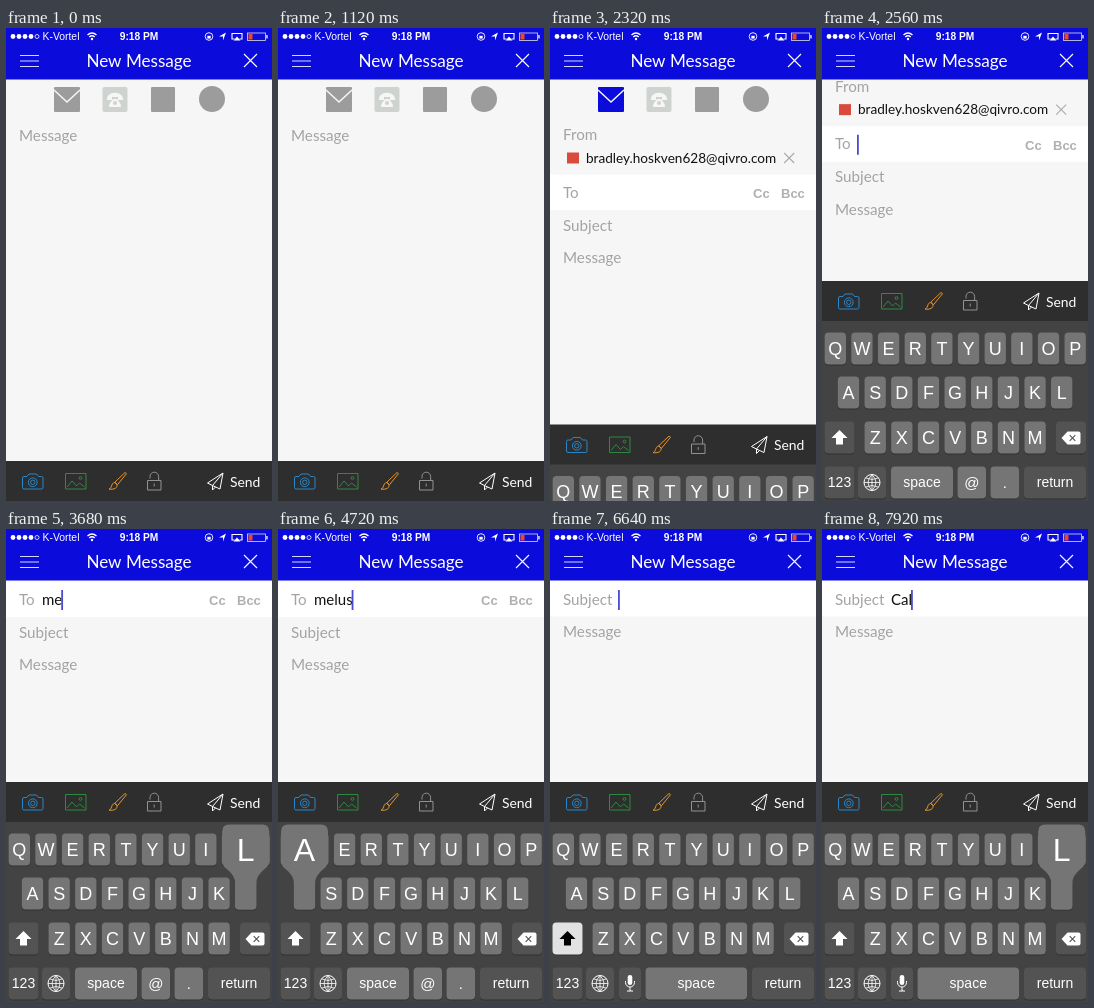
Animation of 266x473 px, one loop 8 s. Source, as an HTML page with a canvas:

```html
<!DOCTYPE html>
<html lang="en">
<head>
<meta charset="utf-8">
<title>New Message</title>
<style>
  html, body { margin: 0; width: 100%; height: 100%; overflow: hidden; background: #f6f6f6; }
  canvas { display: block; width: 266px; height: 473px; }
</style>
</head>
<body>
<canvas id="stage"></canvas>
<script>
const W = 266, H = 473, LOOP = 8000;
const BLUE = '#0b0bdc', GREY = '#9c9c9c', LABEL = '#a3a3a3', PAPER = '#f6f6f6';
const RED_SQUARE = '#d9493c', PURPLE_SQUARE = '#46389c';
const ARIAL = { font: '"Liberation Sans", sans-serif' };
const SENDER = 'bradley.hoskven628@qivro.com';
const SENDER_ALT = 'bradleyhoskven@tulmo.com';
const RECIPIENT = 'melusar.corbrin307@qivro.com';

const canvas = document.getElementById('stage');
const c = canvas.getContext('2d');
const ratio = window.devicePixelRatio || 1;
canvas.width = W * ratio;
canvas.height = H * ratio;

// Key presses: [time, character]; the character lands on release.
const HOLD = 130;
const TO_KEYS = [[3360, 'm'], [3520, 'e'], [3650, 'l'], [3900, 'u'], [4180, 's'], [4720, 'a']];
const SUBJECT_KEYS = [[7120, 'C'], [7400, 'a'], [7630, 'l'], [7890, 'l']];

const ease = (t, from, to) => {
  const x = Math.min(1, Math.max(0, (t - from) / (to - from)));
  return x * x * (3 - 2 * x);
};
const typed = (keys, t) => keys.filter(k => t >= k[0] + HOLD).map(k => k[1]).join('');

function rect(x, y, w, h, color, radius = 0) {
  c.fillStyle = color;
  c.beginPath();
  c.roundRect(x, y, w, h, radius);
  c.fill();
}
function disc(x, y, r, color) {
  c.fillStyle = color;
  c.beginPath();
  c.arc(x, y, r, 0, 7);
  c.fill();
}
function fill(d, color) {
  c.fillStyle = color;
  c.fill(new Path2D(d));
}
function line(d, color, width = 1) {
  c.strokeStyle = color;
  c.lineWidth = width;
  c.stroke(new Path2D(d));
}
function ring(x, y, r, color, width = 1) {
  c.strokeStyle = color;
  c.lineWidth = width;
  c.beginPath();
  c.arc(x, y, r, 0, 7);
  c.stroke();
}
function text(str, x, y, size, color, { font = 'Lato, sans-serif', weight = 400, align = 'left' } = {}) {
  c.font = `${weight} ${size}px ${font}`;
  c.fillStyle = color;
  c.textAlign = align;
  c.fillText(str, x, y + size * 0.35);
  return c.measureText(str).width;
}
const label = (str, y) => text(str, 13, y, 15.2, LABEL);
const cross = (x, y, r, color) =>
  line(`M${x - r} ${y - r}l${2 * r} ${2 * r}M${x + r} ${y - r}l${-2 * r} ${2 * r}`, color, 1.1);

function clipped(y, h, draw) {
  if (h <= 0) return;
  c.save();
  c.beginPath();
  c.rect(0, y, W, h);
  c.clip();
  draw();
  c.restore();
}

function field(str, x, y, t, focusTime, keys) {
  const width = str ? text(str, x, y, 15, '#111') : 0;
  const last = keys.reduce((a, k) => (t >= k[0] ? k[0] : a), focusTime);
  if ((t - last) % 1000 < 600) rect(x - 1 + width, y - 9.5, 1.8, 20, '#4a4ad0');
}

function chip(address, y) {
  rect(17, y - 5.5, 12, 11, RED_SQUARE);
  const width = text(address, 36, y, 13.6, '#111');
  cross(49 + width, y, 5, '#aaa');
}

function accountRow(address, y, color) {
  rect(0, y, W, 37, '#e6e6e6');
  rect(0, y + 36.5, W, 1, '#cfcfcf');
  rect(18, y + 11, 16, 15, color);
  text(address, 46, y + 19, 13.6, '#111');
}

function drawServices(y, picked) {
  rect(48, y - 12, 26, 25, picked ? BLUE : GREY, 1);
  line(`M48 ${y - 9}L61 ${y + 3}L74 ${y - 9}`, PAPER, 1.5);
  rect(96.5, y - 12, 25, 25, '#cfd3cf', 2);
  fill(`M101 ${y - 1}c2-7 14-7 16 0v2h-5v-3h-6v3h-5z`, PAPER);
  fill(`M103 ${y + 8}c0-4 2-5 4-8h4c2 3 4 4 4 8z`, PAPER);
  disc(109, y + 4, 2, '#cfd3cf');
  rect(145, y - 12, 24, 25, GREY, 1);
  disc(206, y, 13, GREY);
}

function drawForm(t) {
  const listOpen = ease(t, 1510, 1780) * (1 - ease(t, 2080, 2320));
  const form = ease(t, 2080, 2320);
  const chipGap = 33 * ease(t, 5600, 5820);
  const scroll = 94 * ease(t, 2403, 2713) + (33 + chipGap) * ease(t, 5960, 6240);
  const toY = 164.5 - scroll, subjectY = toY + 33 + chipGap;
  const toFocus = t >= 2320 && t < 6080, subjectFocus = t >= 6080;

  rect(0, 0, W, H, PAPER);
  drawServices(71 - scroll, t >= 1520);

  if (form > 0) {
    c.globalAlpha = form;
    label('From', 107 - scroll);
    chip(SENDER, 130 - scroll);
    if (toFocus || chipGap) rect(0, toY - 18, W, 35.5 + chipGap, '#fff');
    if (subjectFocus) rect(0, subjectY - 18, W, 35, '#fff');
    label('To', toY);
    text('Cc', 203, toY + 1, 13, '#b0b0b0', { ...ARIAL, weight: 700 });
    text('Bcc', 231, toY + 1, 13, '#b0b0b0', { ...ARIAL, weight: 700 });
    if (chipGap) clipped(toY + 12, chipGap + 5.5, () => chip(RECIPIENT, toY + 23));
    label('Subject', subjectY);
    c.globalAlpha = 1;
    if (toFocus && t >= 2400) {
      const picked = t >= 5520;
      field(picked ? '' : typed(TO_KEYS, t), 36, toY, t, picked ? 5520 : 2400, picked ? [] : TO_KEYS);
    }
    if (subjectFocus) field(typed(SUBJECT_KEYS, t), 69, subjectY, t, 6400, SUBJECT_KEYS);
  }

  label('Message', 107.5 + (subjectY + 32.5 - 107.5) * form);

  clipped(92, 75 * listOpen, () => {
    const y = 92 - 75 * (1 - listOpen);
    accountRow(SENDER, y, RED_SQUARE);
    accountRow(SENDER_ALT, y + 37.5, PURPLE_SQUARE);
  });

  const hint = ease(t, 4880, 5100) * (1 - ease(t, 5440, 5560));
  clipped(88, 37.5 * hint, () => accountRow(RECIPIENT, 88 - 37.5 * (1 - hint), RED_SQUARE));
}

function drawHeader() {
  rect(0, 0, W, 51.5, BLUE);
  for (let i = 0; i < 4; i++) disc(7 + 6 * i, 8.5, 2.4, '#fff');
  ring(31, 8.5, 2, '#fff', 0.8);
  text('K-Vortel', 36.5, 8.5, 10.4, '#fff', ARIAL);
  line('M81.5 7q4.5-4 9 0M83.3 9q2.7-2.4 5.4 0', '#fff', 1.4);
  disc(86, 11, 1.2, '#fff');
  text('9:18 PM', 133, 8.5, 10.2, '#fff', { ...ARIAL, weight: 700, align: 'center' });
  ring(203, 8.5, 3.8, '#fff', 0.9);
  rect(201.3, 7.8, 3.4, 2.8, '#fff');
  fill('M220 4.5L217 12.5V8.5H213z', '#fff');
  line('M228.5 11h-2.5V5.5h10V11h-2.5', '#fff', 1.1);
  fill('M231 8.5l3.5 4h-7z', '#fff');
  c.strokeStyle = '#ddd';
  c.lineWidth = 0.8;
  c.strokeRect(241.5, 5, 18, 7.5);
  rect(260.2, 7, 1.5, 3.5, '#ddd');
  rect(242.5, 6, 4, 5.5, '#f04428');
  line('M14 27.5h19M14 33h19M14 38.5h19', '#d8d8ff', 1);
  text('New Message', 133, 33.5, 17.1, '#fff', { align: 'center' });
  cross(244.5, 32.5, 6.5, '#fff');
}

function drawToolbar() {
  rect(0, 0, W, 41, '#2e2e2e');
  line('M18 15.5h3l2-2.5h7.5l2 2.5h3q1.5 0 1.5 1.5v9.5q0 1.5-1.5 1.5h-17.5q-1.5 0-1.5-1.5v-9.5q0-1.5 1.5-1.5z', '#2a86c8');
  ring(26.8, 21.3, 4.4, '#2a86c8');
  ring(26.8, 21.3, 2.2, '#2a86c8');
  line('M59.5 12.5h20.5v15.5h-20.5zM61 26l5-6 4.5 5 3-3 5 4', '#2c8a40');
  ring(74.5, 17, 1.4, '#2c8a40');
  line('M108.5 21.5L119 11.5l1.5 1.2-9 11zM103 28c3 0 2-6 5.5-6.5 3.5 1 3 4.5 1 5.7-2 1.2-5 1.3-6.5.8z', '#e8952a');
  line('M141.5 19.5h13.5v9.5h-13.5zM144 17.5v-2a4.3 4.3 0 0 1 8.6 0v4M148.2 22.5v3', '#929292');
  line('M217 12L201.5 22l5 2.5zM217 12l-3 16-7.5-3.5M206.5 24.5v4.5l3-3', '#fff');
  text('Send', 224, 21, 13.9, '#fff');
}

const ROWS = [['QWERTYUIOP', 13.3, 11.5], ['ASDFGHJKL', 26.5, 55.5], ['ZXCVBNM', 53.2, 100.5]];
const KEY = '#757575', DARK_KEY = '#535353', PITCH = 26.65;
const glyph = (str, x, y, size) => text(str, x, y, size, '#fff', { ...ARIAL, align: 'center' });

function key(x, y, w, color, str, size = 15) {
  rect(x, y + 1, w, 32, '#303030', 4);
  rect(x, y, w, 32, color, 4);
  if (str) glyph(str, x + w / 2, y + 16, size);
}

function drawPopup(char) {
  const [letters, x0, y] = ROWS.find(row => row[0].includes(char));
  const x = x0 + PITCH * letters.indexOf(char);
  const left = Math.min(W - 49, Math.max(3, x - 23.5)), right = left + 47, top = y - 53;
  fill(`M${left + 7} ${top}H${right - 7}q7 0 7 7V${top + 36}q0 5-4 8` +
    `Q${x + 10.5} ${top + 51} ${x + 10.5} ${top + 59}V${y + 29}q0 3-4 3H${x - 6.5}q-4 0-4-3V${top + 59}` +
    `Q${x - 10.5} ${top + 51} ${left + 4} ${top + 44}q-4-3-4-8V${top + 7}q0-7 7-7z`, '#757575');
  glyph(char, (left + right) / 2, top + 25, 32);
}

function drawKeyboard(t) {
  const subject = t >= 6400;
  const shifted = subject && t < SUBJECT_KEYS[0][0] + HOLD;
  rect(0, 40, W, 182, '#434343');
  c.save();
  c.translate(0, 40);
  for (const [letters, x, y] of ROWS)
    [...letters].forEach((char, i) => key(x + PITCH * i - 10.7, y, 21.4, KEY, char, 18));

  key(2.5, 100.5, 30, shifted ? '#e2e2e2' : DARK_KEY);
  fill('M17.5 109l8 8h-4.5v6.5h-7v-6.5h-4.5z', shifted ? '#000' : '#fff');
  key(234, 100.5, 30, DARK_KEY);
  fill('M239.5 117l6-6.5h11q2 0 2 2v9q0 2-2 2h-11z', '#fff');
  cross(250.5, 117, 2.8, DARK_KEY);

  key(2.5, 145.5, 30, DARK_KEY, '123', 14);
  key(36, 145.5, 28, DARK_KEY);
  ring(50, 161.5, 8, '#fff');
  line('M42 161.5h16M50 153.5v16M50 153.5q-8 8 0 16M50 153.5q8 8 0 16M44 157q6 3 12 0M44 166q6-3 12 0', '#fff', 0.8);
  if (subject) {
    key(69, 145.5, 22, DARK_KEY);
    rect(77.7, 153, 4.6, 10, '#fff', 2.3);
    line('M75.5 159v1.5a4.5 4.5 0 0 0 9 0V159M80 165v4M77 169h6', '#fff');
    key(95.5, 145.5, 101.5, KEY, 'space', 14);
  } else {
    key(69, 145.5, 62, KEY, 'space', 14);
    key(135.5, 145.5, 28.5, KEY, '@');
    key(168.5, 145.5, 28.5, KEY, '.');
  }
  key(202, 145.5, 62, DARK_KEY, 'return', 14);

  const press = [...TO_KEYS, ...SUBJECT_KEYS].find(k => t >= k[0] && t < k[0] + HOLD);
  if (press) drawPopup(press[1].toUpperCase());
  c.restore();
}

function draw() {
  const t = performance.now() % LOOP;
  c.setTransform(ratio, 0, 0, ratio, 0, 0);
  drawForm(t);
  drawHeader();
  const rise = 180 * ease(t, 2240, 2520);
  c.translate(0, 433 - rise);
  drawToolbar();
  if (rise) drawKeyboard(t);
  requestAnimationFrame(draw);
}
draw();
</script>
</body>
</html>
```
